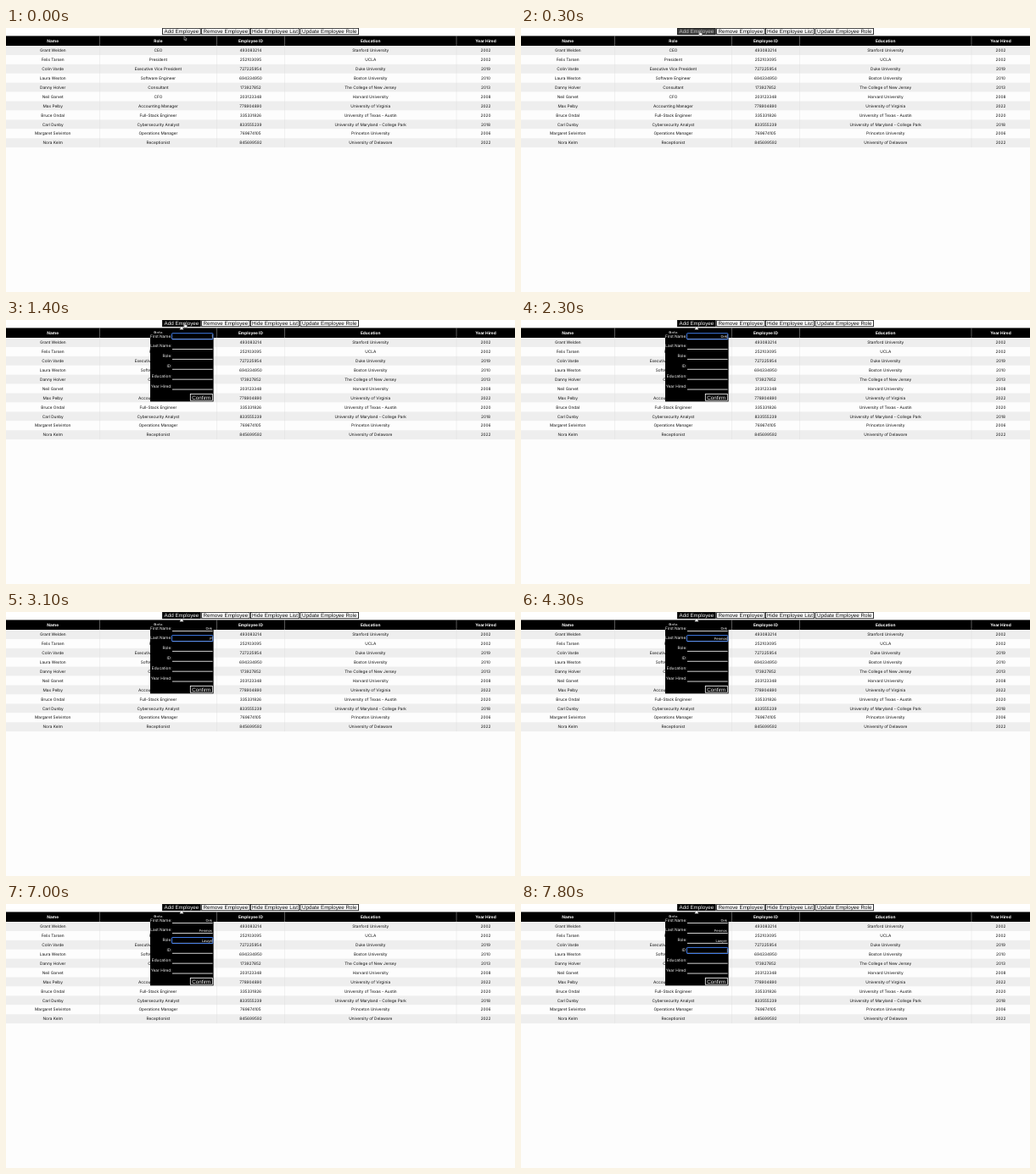
Write an HTML page that moves like this. It is 600 by 312 pixels and loops after 8 s.

```html
<!DOCTYPE html>
<html lang="en">
<head>
<meta charset="utf-8">
<title>Employee list</title>
<style>
  html, body { margin: 0; width: 100%; height: 100%; overflow: hidden; background: #fdfdfd; }
  svg { display: block; width: 100%; height: 100%; }
  text { font: 4.75px Inter, sans-serif; text-rendering: geometricPrecision; white-space: pre; }
  .cell { text-anchor: middle; fill: #111; }
  .head { text-anchor: middle; fill: #fff; font-size: 4.8px; font-weight: 700; }
  .button { text-anchor: middle; font: 6.25px "Liberation Sans", Arial, sans-serif; }
  .label { text-anchor: end; fill: #f4f4f4; }
  .value { text-anchor: end; fill: #fff; font: 4.2px "Liberation Sans", Arial, sans-serif; }
</style>
</head>
<body>
<svg id="stage" viewBox="0 0 600 312"></svg>
<script>
const LOOP = 8000;
const stage = document.getElementById('stage');

function add(parent, tag, attrs, content) {
  const node = document.createElementNS('http://www.w3.org/2000/svg', tag);
  for (const key in attrs) node.setAttribute(key, attrs[key]);
  if (content !== undefined) node.textContent = content;
  parent.append(node);
  return node;
}
const box = (parent, x, y, width, height, fill, extra) =>
  add(parent, 'rect', { x, y, width, height, fill, ...extra });
const label = (parent, type, x, y, content) =>
  add(parent, 'text', { class: type, x, y }, content);
const show = (node, on) => node.setAttribute('visibility', on ? 'visible' : 'hidden');

// Table
const TOP = 9.4, BODY = 21.04, ROW = 10.92;
const edges = [0, 110.4, 248.4, 328.4, 531, 600];
const centre = i => (edges[i] + edges[i + 1]) / 2;
const people = [
  ['Grant Welden', 'CEO', '493083214', 'Stanford University', '2002'],
  ['Felix Tarsen', 'President', '252103095', 'UCLA', '2002'],
  ['Colin Varde', 'Executive Vice President', '727225954', 'Duke University', '2019'],
  ['Laura Wexton', 'Software Engineer', '694334950', 'Boston University', '2010'],
  ['Danny Holver', 'Consultant', '173927852', 'The College of New Jersey', '2013'],
  ['Neil Garvet', 'CFO', '203123348', 'Harvard University', '2008'],
  ['Max Pelby', 'Accounting Manager', '778904890', 'University of Virginia', '2022'],
  ['Bruce Ondal', 'Full-Stack Engineer', '335331826', 'University of Texas - Austin', '2020'],
  ['Carl Dunby', 'Cybersecurity Analyst', '833555239', 'University of Maryland - College Park', '2018'],
  ['Margaret Selvinton', 'Operations Manager', '769674105', 'Princeton University', '2006'],
  ['Nora Kelm', 'Receptionist', '845699592', 'University of Delaware', '2022']
];

box(stage, 0, 0, 600, TOP, '#fff');
box(stage, 0, TOP, 600, BODY - TOP, '#000');
['Name', 'Role', 'Employee ID', 'Education', 'Year Hired'].forEach((title, i) =>
  label(stage, 'head', centre(i), 17.1, title));
people.forEach((person, r) => {
  const y = BODY + r * ROW;
  box(stage, 0, y, 600, ROW, r % 2 ? '#fdfdfd' : '#eee');
  person.forEach((entry, i) => label(stage, 'cell', centre(i), y + 7.15, entry));
});
edges.slice(1, -1).forEach(x =>
  box(stage, x - 0.2, TOP, 0.4, BODY - TOP + ROW * people.length, '#ddd'));

// Toolbar
const buttons = [
  ['Add Employee', 184.2, 229.6],
  ['Remove Employee', 230.3, 287.5],
  ['Hide Employee List', 288.1, 345.9],
  ['Update Employee Role', 346.7, 415.8]
].map(([name, left, right]) => ({
  face: box(stage, left + 0.4, 0.3, right - left - 0.8, 7.4, '#fff', { stroke: '#000', 'stroke-width': 0.8 }),
  text: label(stage, 'button', (left + right) / 2, 5.9, name)
}));
const addButton = buttons[0];

// Pop-up form
const popup = add(stage, 'g', {});
add(popup, 'path', { d: 'M204.5 11.2 207 8.5 209.5 11.2Z', fill: '#fff' });
box(popup, 170, 15.6, 74.6, 80.8, '#000');
const PITCH = 11.9;
const values = ['First Name:', 'Last Name:', 'Role:', 'ID:', 'Education:', 'Year Hired:'].map((name, i) => {
  const y = i * PITCH;
  label(popup, 'label', 195.6, 20.5 + y, name);
  box(popup, 196, 22.1 + y, 47.6, 0.9, '#e8e8e8');
  return label(popup, 'value', 242.9, 20.75 + y, '');
});
box(popup, 217.3, 87.4, 26, 7.8, '#000', { stroke: '#fff', 'stroke-width': 0.8 });
label(popup, 'button', 230.3, 93.5, 'Confirm').setAttribute('fill', '#fff');

const focus = add(popup, 'g', {});
box(focus, 195.6, 15.7, 48.3, 7.1, 'none', { stroke: '#3f7ae6', 'stroke-width': 1, rx: 0.5 });
const caret = box(focus, 242.9, 17, 0.4, 4.6, '#fff');

// Pointer shapes, tip at the origin
const outline = { fill: '#000', stroke: '#fff', 'stroke-width': 0.4, 'stroke-linejoin': 'round' };
const arrow = add(stage, 'path', { ...outline, d: 'M0 0V4.6L1.1 3.6 1.8 5.3 2.6 5 1.9 3.3H3.3Z' });
const hand = add(stage, 'path', {
  fill: '#fff', stroke: '#000', 'stroke-width': 0.3, 'stroke-linejoin': 'round',
  d: 'M.9 3.6V.6Q1.3-.2 1.7.6V2.2L4 2.7Q4.6 2.9 4.5 3.6L4 5.6H1.6L0 3.5Q.2 2.9 .9 3.6Z'
});

// Each field: time of focus, then the time of every keystroke
const fields = [
  { at: 400, word: 'Dirk', keys: [1700, 1900, 2100, 2300] },
  { at: 2500, word: 'Fenmos', keys: [3000, 3500, 3800, 4000, 4100, 4300] },
  { at: 4700, word: 'Lawyer', keys: [5400, 5800, 6200, 6700, 7000, 7300] },
  { at: 7600, word: '', keys: [] }
];

// Pointer and button fade: time, x, y, darkness
const approach = [
  [0, 210, 9.8, 0],
  [100, 210, 8, 0],
  [200, 209.6, 5, 0.35],
  [300, 209.2, 3.4, 0.75],
  [400, 209.2, 3.4, 1]
];

function draw(t) {
  const [, x, y, dark] = approach.findLast(step => step[0] <= t);
  const grey = level => `rgb(${Array(3).fill(Math.round(255 * level))})`;
  addButton.face.setAttribute('fill', grey(1 - dark));
  addButton.text.setAttribute('fill', grey(dark));

  for (const pointer of [arrow, hand]) pointer.setAttribute('transform', `translate(${x} ${y})`);
  show(arrow, t < 200);
  show(hand, t >= 200 && t < 1700);

  popup.setAttribute('display', t < 400 ? 'none' : 'inline');
  fields.forEach(({ at, word, keys }, i) => {
    const typed = keys.filter(key => key <= t);
    values[i].textContent = word.slice(0, typed.length);
    if (t < at) return;
    focus.setAttribute('transform', `translate(0 ${i * PITCH})`);
    const idle = t - (typed.at(-1) ?? at);
    caret.setAttribute('opacity', idle % 1000 < 500 ? 1 : 0);
  });
}

function tick() {
  draw(performance.now() % LOOP);
  requestAnimationFrame(tick);
}
tick();
</script>
</body>
</html>
```
